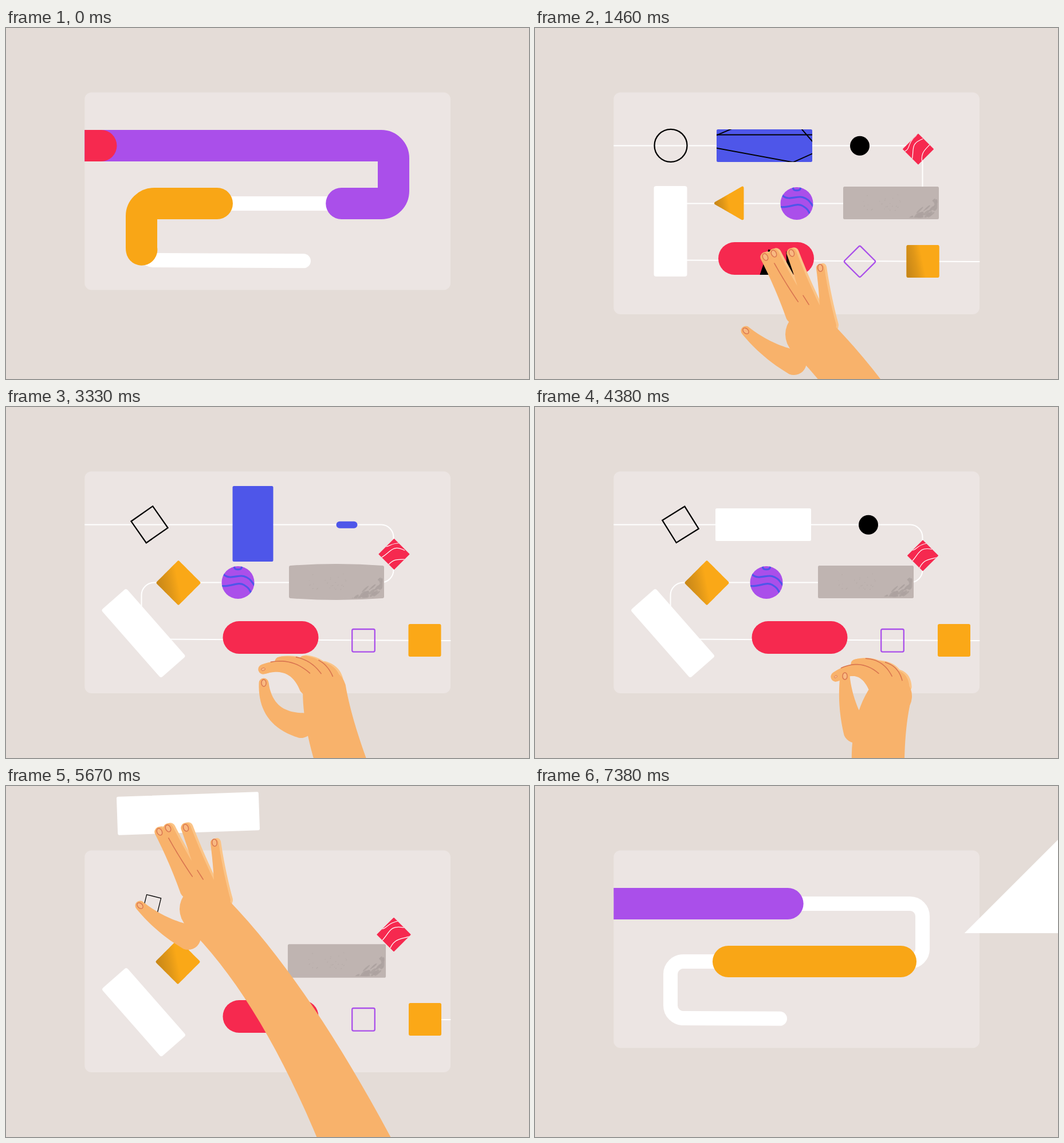
Recreate the animation shown at these times as an HTML page. Size 913x613 px, loop 7.43 s.

```html
<!DOCTYPE html>
<html lang="en">
<head>
<meta charset="utf-8">
<title>Shapes on a line</title>
<style>
html, body { margin: 0; width: 100%; height: 100%; overflow: hidden; background: #e4dcd7; }
svg { display: block; width: 913px; height: 613px; }
.line { fill: none; stroke-linecap: round; }
.soft { stroke-width: 5; stroke-linejoin: round; }
</style>
</head>
<body>
<svg id="stage" viewBox="0 0 913 613">
  <defs>
    <clipPath id="boardClip"><rect x="137.3" y="100" width="639" height="420"/></clipPath>
    <linearGradient id="amber" x1="0" y1=".6" x2="1" y2=".4">
      <stop offset="0" stop-color="#c88718"/><stop offset=".28" stop-color="#e09718"/>
      <stop offset=".5" stop-color="#faa817"/>
    </linearGradient>
  </defs>
</svg>
<script>
const LOOP = 7430;
const C = {
  purple: '#aa4fea', orange: '#f9a616', red: '#f6294f', blue: '#4e56e9',
  skin: '#f8b26b', rim: '#fbc487', crease: '#d97550', grey: '#bfb4b1', patch: '#ada3a0'
};
const stage = document.getElementById('stage');
const defs = stage.querySelector('defs');

function set(el, attrs) {
  for (const k in attrs) el.setAttribute(k, attrs[k]);
  return el;
}
function add(tag, attrs = {}, parent = stage) {
  const el = document.createElementNS('http://www.w3.org/2000/svg', tag);
  parent.appendChild(el);
  return set(el, attrs);
}
const RAD = Math.PI / 180;
const clamp = x => Math.min(1, Math.max(0, x));
const lerp = (a, b, k) => a + (b - a) * k;
const smooth = x => x < .5 ? 4 * x ** 3 : 1 - (2 - 2 * x) ** 3 / 2;
const backIn = x => 2.70158 * x ** 3 - 1.70158 * x * x;
const ramp = (t, from, to) => smooth(clamp((t - from) / (to - from)));

// Blends numbers, lists and objects alike.
function mix(a, b, k) {
  if (typeof a === 'number') return lerp(a, b, k);
  if (Array.isArray(a)) return a.map((v, i) => mix(v, b[i], k));
  return Object.fromEntries(Object.keys(a).map(n => [n, mix(a[n], b[n], k)]));
}
// rows: [time, value]
function key(rows, t) {
  const i = rows.findIndex(row => row[0] > t);
  if (i === 0) return rows[0][1];
  if (i < 0) return rows[rows.length - 1][1];
  const [a, b] = [rows[i - 1], rows[i]];
  return mix(a[1], b[1], ramp(t, a[0], b[0]));
}
// The four resting layouts shared by the shapes.
const layout = (a, b, c, d) =>
  [[1500, a], [2250, b], [2400, b], [3200, c], [3400, c], [3750, d]];

function size(t, start, end) {
  if (t < 3000) return Math.max(0, 1 - backIn(1 - clamp((t - start) / 350)));
  return Math.max(0, 1 - backIn(clamp((t - end) / 300)));
}
const place = (x, y, s = 1, r = 0) => `translate(${x} ${y}) rotate(${r}) scale(${s})`;
const box = (el, w, h, r) => set(el, { x: -w / 2, y: -h / 2, width: w, height: h, rx: r });

let seed = 7;
const rnd = () => (seed = seed * 16807 % 2147483647) / 2147483647;

// ---- board and running strokes
const board = add('rect', { x: 137.3, y: 112.5, width: 638.7, rx: 12, fill: '#ece5e3' });
const ROUTE = 'M137 205.5H655a21.5 22 0 0 1 21.5 22V284.5a21.5 22 0 0 1 -21.5 22H259' +
  'a22.5 22 0 0 0 -22.5 22V383.5a22.5 22 0 0 0 22.5 22L777 408';
const lanes = add('g', { 'clip-path': 'url(#boardClip)' });
// head and tail: distance at the loop point, speed in px per ms
const runners = [
  { stroke: '#fff', head: [1422, 1.84] },
  { stroke: C.orange, head: [1129, 3.44], tail: [924, 5.4] },
  { stroke: C.purple, head: [704, 8.16], tail: [-40, 6] },
  { stroke: C.red, head: [21, 8], tail: [-300, 5] }
];
for (const r of runners) r.el = add('path', { d: ROUTE, class: 'line', stroke: r.stroke }, lanes);

function drawLanes(t) {
  const u = t > 6500 ? t - LOOP : t;
  const erased = t > 6500 ? 0 : Math.max(0, (t - 4560) * 1.494);
  for (const { el, head, tail } of runners) {
    const to = Math.min(1740, head[0] + head[1] * u);
    const from = tail ? tail[0] + tail[1] * u : erased;
    set(el, {
      'stroke-width': tail ? 55 : lerp(25, 2, ramp(u, 250, 480)),
      'stroke-dasharray': `${Math.max(0, to - from)} 4000`, 'stroke-dashoffset': -from,
      visibility: to > Math.max(from, -30) && from < 1720 ? 'visible' : 'hidden'
    });
  }
  board.setAttribute('height', 345 + 42.5 * (ramp(t, 150, 500) - ramp(t, 6790, 7100)));
}

// ---- shapes
const shape = (tag, attrs = {}) => {
  const g = add('g');
  return { g, el: add(tag, attrs, g) };
};
const clipFor = (id, tag, attrs) => add(tag, attrs, add('clipPath', { id }, defs));

const white = shape('rect', { fill: '#fff', stroke: '#fff', 'stroke-width': 2 });
const pill = shape('rect', { fill: C.red });
const stripes = add('path', { d: 'M-11 28.500L4 -16L10 -14V28.500ZM36 28.500L35 -13L44 0L48 28.500Z' }, pill.g);
const frame = shape('rect', { fill: 'none', stroke: C.purple, 'stroke-width': 2.3 });
const block = shape('rect', { fill: '#fba817' });
const shade = box(add('rect', { fill: 'url(#amber)' }, block.g), 57, 57, 3);
const amber = shape('path', { fill: 'url(#amber)', stroke: 'url(#amber)', class: 'soft' });

const ball = shape('circle', { r: 28.5, fill: C.purple });
clipFor('ballClip', 'circle', { r: 28.5 });
add('path', {
  d: 'M-25 -14C-14 -4 0 -14 10 -11S22 -4 28 4M-29 6C-12 8 0 -2 10 4S20 13 24 20M-7 -30Q-7 -22 0 -23Q7 -22 7 -30',
  class: 'line', stroke: C.blue, 'stroke-width': 3.2, 'clip-path': 'url(#ballClip)'
}, ball.g);

const slab = shape('path', { fill: C.grey, stroke: C.grey, class: 'soft' });
const slabClip = clipFor('slabClip', 'path');
const patches = add('g', { fill: C.patch, 'clip-path': 'url(#slabClip)' }, slab.g);
for (let i = 0; i < 75; i++) {
  const near = i < 50, d = rnd() * 62;
  const x = near ? 22 + d + rnd() * 20 : -48 + rnd() * 65;
  const y = near ? 30 - d * .75 + rnd() * 16 : -14 + rnd() * 28;
  add('ellipse', {
    rx: near ? 2 + rnd() * 6 : .5 + rnd(), ry: near ? 1 + rnd() * 2.5 : .7,
    transform: place(x, y, 1, -42), opacity: near ? .85 : .5
  }, patches);
}

const gem = shape('rect', { fill: C.red });
box(gem.el, 38.6, 38.6, 1).setAttribute('transform', 'rotate(45)');
clipFor('gemClip', 'path', { d: 'M0 -27L27 0L0 27L-27 0Z' });
const veins = add('path', {
  d: 'M-22 -9C-10 -8 -12 -19 10 -22M-21 12C-6 -2 -8 -16 16 -11M-8 27C0 4 12 8 28 2',
  class: 'line', stroke: '#fff', 'stroke-width': 1.2
}, add('g', { 'clip-path': 'url(#gemClip)' }, gem.g));

const dot = shape('rect');
const ring = shape('rect', { fill: 'none', 'stroke-width': 2.3 });
const slate = shape('path', { 'stroke-linejoin': 'round' });
const slateClip = clipFor('slateClip', 'path');
const scratch = add('g', { stroke: '#000', 'stroke-width': 1.9, 'clip-path': 'url(#slateClip)' }, slate.g);
// one point on each line, its angle, and how far it slides and turns
const cuts = [
  [0, -19, 0, 0, -2], [65, -29, 49, -76, 1], [50, 29, -24, -76, -1],
  [-58, -29, -23, 134, -49], [50, 29, 10.5, -70, 0]
].map(cut => ({ cut, el: add('path', { d: 'M-300 0H300' }, scratch) }));

// x, y, width, height, turn
const slatePath = [
  ...layout([400.5, 205.5, 167, 57, 0], [483, 205.5, 172, 55, 2],
    [431, 204, 71, 132, 0], [398.5, 205.5, 167, 57, 0]),
  [4950, [398.5, 205.5, 167, 57, 0]], [5650, [318, 48, 248, 67, -2]],
  [6000, [318, 48, 248, 67, -2]], [6600, [560, 138.5, 474, 237, 0]]
];
function drawSlate(t) {
  const [x, y, w, h, r] = key(slatePath, t);
  const top = 1 - ramp(t, 6100, 6550), corner = 5 * top;
  const dash = 422 * Math.max(0, (t - 7200) / 180) ** 2;
  const a = (w - corner) / 2, b = (h - corner) / 2;
  const fill = t < 3540 ? C.blue : '#fff';
  set(slate.el, {
    d: `M${-a * top} ${-b}H${a * top}L${a} ${b}H${-a}Z`, fill, stroke: fill, 'stroke-width': corner
  });
  slateClip.setAttribute('d', `M${-w / 2} ${-h / 2}h${w}v${h}h${-w}Z`);
  slate.g.setAttribute('transform', place(x + dash, y, size(t, 540, LOOP), r));
  const k = ramp(t, 1500, 2250);
  scratch.setAttribute('visibility', t < 2800 ? 'visible' : 'hidden');
  for (const { cut: [cx, cy, angle, slide, turn], el } of cuts)
    el.setAttribute('transform', place(cx + slide * k, cy, 1, angle + turn * k));
}

// Distance from centre to edge of a regular polygon with a corner at angle `first`.
function polar(n, radius, first, deg) {
  const step = 360 / n, d = ((deg - first) % step + step) % step;
  return radius * Math.cos(Math.PI / n) / Math.cos((d - step / 2) * RAD);
}
function morph(tri, pent, quad) {
  const pts = [];
  for (let deg = 0; deg < 360; deg += 6) {
    const r = tri * polar(3, 31, 180, deg) + pent * polar(5, 36.5, -90, deg) + quad * polar(4, 36, -90, deg);
    pts.push([r * Math.cos(deg * RAD), r * Math.sin(deg * RAD)]);
  }
  return 'M' + pts.join('L') + 'Z';
}

const paths = {
  ring: [...layout([237, 57, 28.5, 0], [300, 46, 0, -30], [250.5, 46, 0, -35], [254, 46, 0, -32]),
    [5300, [254, 46, 0, -32]], [5670, [255, 46, 0, 14]]],
  dot: layout([567, 34, 34], [650.5, 50, 17], [595, 37, 12], [582, 34, 34]),
  gem: layout([669, 211.5, 1, 1, -32], [676, 287, 1.2, .84, 30], [677.5, 257, 1, 1, 14], [677, 259.5, 1, 1, 0]),
  slab: layout([621.5, 167, 0], [537.5, 157, 4], [577, 166, 3], [577.5, 167, 0]),
  ball: layout(457, 370, 405, 404),
  amber: layout([346.5, 306, 1, 0, 0], [270, 307, 0, 1, 0], [301, 307, 0, 0, 1], [300, 307, 0, 0, 1]),
  white: layout([236.5, 355, 90], [284, 405, 0], [240, 395, 48.7], [240.5, 395, 48.7]),
  pill: layout(403.5, 502.5, 462, 462),
  frame: layout([567, 45], [664.5, 45], [624, 0], [624, 0]),
  block: layout(677, 755.5, 731, 731.5)
};
function drawShapes(t) {
  const at = name => key(paths[name], t);
  const put = (s, x, y, start, end, r = 0) =>
    s.g.setAttribute('transform', place(x, y, size(t, start, end), r));

  let [x, w, h, r] = at('ring');
  box(ring.el, w, w, h).setAttribute('stroke', t > 1900 && t < 2800 ? C.orange : '#000');
  put(ring, x, 205.3, 500, 5415, r);

  [x, w, h] = at('dot');
  box(dot.el, w, h, h / 2).setAttribute('fill', t > 2800 && t < 3560 ? C.blue : '#000');
  put(dot, x, 205.7, 580, 5200);

  const [gx, gy, sx, sy, turn] = at('gem');
  const s = size(t, 620, 5550);
  gem.g.setAttribute('transform', `translate(${gx} ${gy}) scale(${sx * s} ${sy * s})`);
  veins.setAttribute('transform', `rotate(${turn})`);

  const [bx, bw, bulge] = at('slab');
  const a = (bw - 5) / 2, b = 26, m = b + bulge * 2;
  const d = `M${-a} ${-b}Q0 ${-m} ${a} ${-b}V${b}Q0 ${m} ${-a} ${b}Z`;
  slab.el.setAttribute('d', d);
  slabClip.setAttribute('d', d);
  put(slab, bx, 305.5, 660, 5630);

  put(ball, at('ball'), 306.5, 700, 5250);

  const [ax, ay, ...sides] = at('amber');
  amber.el.setAttribute('d', morph(...sides));
  put(amber, ax, ay, 740, 5700);

  const [wx, wy, wr] = at('white');
  box(white.el, 156, 56, 3).setAttribute('fill-opacity', 1 - ramp(t, 1950, 2250) + ramp(t, 2400, 2800));
  put(white, wx, wy, 780, 5800, wr);

  box(pill.el, 167, 57, 28.5);
  stripes.setAttribute('opacity', t > 1050 && t < 1900 ? 1 : 0);
  put(pill, at('pill'), 402.5, 820, 5750);

  const [fx, fr] = at('frame');
  box(frame.el, 39.6, 39.6, 2.5);
  put(frame, fx, 407.8, 860, 5850, fr);

  box(block.el, 57, 57, 3);
  shade.setAttribute('opacity', 1 - ramp(t, 1550, 2000));
  put(block, at('block'), 407.5, 900, 5900);
}

// ---- hand: tapered limbs for the arm, thumb and four fingers
const POSES = {
  open: {
    arm: [[645, 700], [497, 412], [345, 215]], girth: [64, 47, 42],
    knuckles: [[320, 180], [378, 200]], tips: [[268, 80], [283, 74], [314, 73], [364, 99]], curl: 0,
    thumb: [[318, 264], [234, 209]], bend: -.05
  },
  push: {
    arm: [[730, 690], [700, 560], [672, 470]], girth: [42, 45, 46],
    knuckles: [[632, 455], [695, 445]], tips: [[567, 399], [597, 398], [622, 398], [648, 402]], curl: .15,
    thumb: [[633, 534], [565, 490]], bend: -.05
  },
  loose: {
    arm: [[615, 700], [574, 586], [556, 495]], girth: [44, 43, 38],
    knuckles: [[528, 487], [572, 482]], tips: [[449, 458], [478, 445], [520, 443], [552, 452]], curl: .2,
    thumb: [[515, 556], [450, 482]], bend: -.2
  },
  pinch: {
    arm: [[605, 700], [600, 588], [620, 505]], girth: [42, 46, 38],
    knuckles: [[598, 487], [640, 488]], tips: [[525, 471], [560, 449], [597, 452], [625, 465]], curl: .25,
    thumb: [[560, 565], [541, 470]], bend: -.05
  }
};
// time, pose, offset
const handPath = [
  [550, 'open', 150, 590], [1250, 'open', 134, 320], [1520, 'open', 134, 320],
  [2250, 'push', 0, 0], [2400, 'push', 0, 0], [3200, 'loose', 0, 0], [3450, 'loose', 0, 0],
  [4200, 'pinch', 0, 0], [4480, 'pinch', 0, 0], [4950, 'open', 85, 130],
  [5650, 'open', 0, 0], [5850, 'open', 0, 0], [6600, 'open', 140, 640]
].map(([time, name, x, y]) => [time, { pose: POSES[name], x, y }]);

const hand = add('g');
const rim = add('path', { fill: C.rim, transform: 'translate(4 -1)' }, hand);
const skin = add('path', { fill: C.skin }, hand);
const creases = add('path', { class: 'line', stroke: C.crease, 'stroke-width': 1.6 }, hand);
const nails = [0, 1, 2, 3, 4].map(() => add('ellipse',
  { rx: 4.3, ry: 6.3, fill: '#f9b981', stroke: C.crease, 'stroke-width': 1.5 }, hand));

// A limb passes through three points with a radius at each; it returns both edges.
function limb(from, via, to, radii) {
  const steps = 20, right = [], left = [];
  const control = (a, m, b) => 2 * m - (a + b) / 2;
  const curve = (a, m, b, k) => lerp(lerp(a, control(a, m, b), k), lerp(control(a, m, b), b, k), k);
  const slope = (a, m, b, k) => lerp(control(a, m, b) - a, b - control(a, m, b), k);
  let angle;
  for (let i = 0; i <= steps; i++) {
    const k = i / steps, r = curve(...radii, k);
    const [x, y] = [0, 1].map(j => curve(from[j], via[j], to[j], k));
    angle = Math.atan2(...[1, 0].map(j => slope(from[j], via[j], to[j], k)));
    const nx = -Math.sin(angle) * r, ny = Math.cos(angle) * r;
    right.push([x + nx, y + ny]);
    left.push([x - nx, y - ny]);
  }
  const cap = r => `A${r} ${r} 0 0 0 `;
  const d = 'M' + right.join('L') + cap(radii[2]) + left.reverse().join('L') + cap(radii[0]) + right[0] + 'Z';
  return { d, right, tip: to, turn: angle / RAD + 90 };
}
function bent(base, tip, curl, radii) {
  const dx = tip[0] - base[0], dy = tip[1] - base[1];
  const via = [base[0] + dx / 2 - dy * curl, base[1] + dy / 2 + dx * curl];
  return limb(base, via, tip, radii);
}

function drawHand(t) {
  const { pose, x, y } = key(handPath, t);
  const arm = limb(...pose.arm, pose.girth);
  const thumb = bent(...pose.thumb, pose.bend, [22, 14.5, 8.5]);
  const fingers = pose.tips.map((tip, i) => {
    const thick = i === 3 ? .82 : 1;
    return bent(mix(...pose.knuckles, i / 3), tip, pose.curl, [17, 11, 8.7].map(r => r * thick));
  });
  const outline = fingers.map(f => f.d).join('');
  hand.setAttribute('transform', place(x, y));
  rim.setAttribute('d', outline);
  skin.setAttribute('d', arm.d + thumb.d + outline);

  const reach = [.9, .35 + 2 * pose.curl, .1 + 3 * pose.curl];
  creases.setAttribute('d', reach.map((end, i) => {
    const run = fingers[i].right.slice(3, Math.round(20 * Math.min(.9, end)));
    return run.length > 1 ? 'M' + run.join('L') : '';
  }).join(''));
  [...fingers, thumb].forEach((f, i) => {
    const scale = i === 4 ? .95 : Math.max(0, 1 - pose.curl * (i ? 10 : 2.2));
    nails[i].setAttribute('transform', place(...f.tip, scale, f.turn));
    nails[i].setAttribute('visibility', scale > .05 ? 'visible' : 'hidden');
  });
}

function render(t) {
  drawLanes(t);
  drawShapes(t);
  drawSlate(t);
  drawHand(t);
}
const began = performance.now();
function tick() {
  render((performance.now() - began) % LOOP);
  requestAnimationFrame(tick);
}
tick();
</script>
</body>
</html>
```
